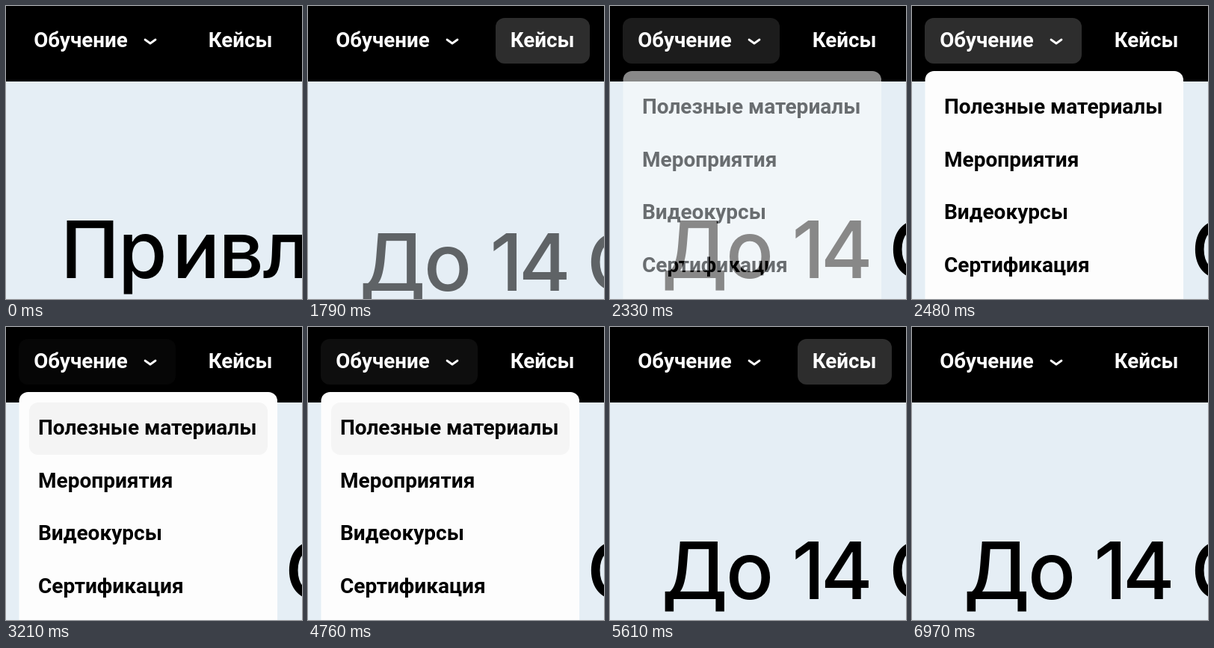
Recreate the animation shown at these times as an HTML page with a canvas. Size 396 px wide and 392 px high, loop 7330 ms.

```html
<!DOCTYPE html>
<html lang="ru">
<head>
<meta charset="utf-8">
<title>Меню</title>
<style>
  html, body { margin: 0; width: 100%; height: 100%; overflow: hidden; background: #e5eef5; }
  canvas { display: block; }
</style>
</head>
<body>
<canvas id="stage" width="396" height="392"></canvas>
<script>
const LOOP = 7330;
const HEADER_FONT = '600 27.7px Roboto, sans-serif';
const MENU_FONT = '600 28px Roboto, sans-serif';
const TITLE_FONT = '540 106px Inter, sans-serif';
const ITEMS = ['Полезные материалы', 'Мероприятия', 'Видеокурсы', 'Сертификация'];

// Letters with the horizontal centre of their ink
const FIRST_TITLE = [['П', 112.5], ['р', 184], ['и', 254.5], ['в', 316], ['л', 371.5]];
const SECOND_TITLE = [['Д', 113], ['о', 187], ['1', 263.5], ['4', 316.5], ['С', 412]];
const TITLE_SWAP = 1790;

// Opacity over time, as [ms, value] pairs
const CASES_HOVER = [[1450, 0], [1640, 1], [2060, 1], [2240, 0], [5300, 0], [5450, 1], [6240, 1], [6480, 0]];
const LEARN_HOVER = [[2210, 0], [2400, 1], [3050, 1], [3210, 0.14], [4730, 0.14], [4880, 1], [5120, 1], [5350, 0]];
const MENU = [[2240, 0], [2410, 1], [5120, 1], [5350, 0]];
const ITEM_HOVER = [[3050, 0], [3210, 1], [4730, 1], [4880, 0]];

const canvas = document.getElementById('stage');
const ctx = canvas.getContext('2d');
const layer = document.createElement('canvas');
layer.width = canvas.width;
layer.height = canvas.height;
const menuCtx = layer.getContext('2d');

function track(keys, t) {
  const next = keys.findIndex(([time]) => time > t);
  if (next === 0) return keys[0][1];
  if (next < 0) return keys[keys.length - 1][1];
  const [t0, v0] = keys[next - 1];
  const [t1, v1] = keys[next];
  return v0 + (v1 - v0) * (t - t0) / (t1 - t0);
}

function box(c, x, y, w, h, color, alpha = 1) {
  c.globalAlpha = alpha;
  c.fillStyle = color;
  c.beginPath();
  c.roundRect(x, y, w, h, 12);
  c.fill();
  c.globalAlpha = 1;
}

function label(c, text, x, y, font, color) {
  c.font = font;
  c.fillStyle = color;
  c.fillText(text, x, y);
}

function drawTitle(t) {
  const entering = t >= TITLE_SWAP;
  const p = entering ? Math.min(1, (t - TITLE_SWAP) / 210) : 1;
  const rest = (1 - p) ** 2;
  ctx.font = TITLE_FONT;
  ctx.fillStyle = '#000';
  ctx.globalAlpha = 1 - 0.42 * rest;
  for (const [char, centre] of entering ? SECOND_TITLE : FIRST_TITLE) {
    const ink = ctx.measureText(char);
    const x = centre + (ink.actualBoundingBoxLeft - ink.actualBoundingBoxRight) / 2;
    ctx.fillText(char, x, 364 + 17 * rest);
  }
  ctx.globalAlpha = 1;
}

function drawHeader(t) {
  ctx.fillStyle = '#000';
  ctx.fillRect(0, 0, 396, 101);
  box(ctx, 17, 16, 210, 61, '#2d2d2d', track(LEARN_HOVER, t));
  box(ctx, 251, 16, 126, 61, '#2d2d2d', track(CASES_HOVER, t));
  label(ctx, 'Обучение', 37.2, 55, HEADER_FONT, '#fff');
  label(ctx, 'Кейсы', 270.8, 55, HEADER_FONT, '#fff');

  ctx.strokeStyle = '#fff';
  ctx.lineWidth = 2.8;
  ctx.lineCap = ctx.lineJoin = 'round';
  ctx.beginPath();
  ctx.moveTo(186, 45);
  ctx.lineTo(193, 50);
  ctx.lineTo(200, 45);
  ctx.stroke();
}

// Rendered on its own layer so that it fades as one group
function drawMenu(t) {
  const alpha = track(MENU, t);
  if (!alpha) return;
  menuCtx.clearRect(0, 0, 396, 392);
  box(menuCtx, 17.5, 87, 345.5, 330, '#fdfdfd');
  box(menuCtx, 31, 101, 319, 70, '#f4f4f4', track(ITEM_HOVER, t));
  ITEMS.forEach((text, i) => label(menuCtx, text, 43, 144 + 70.67 * i, MENU_FONT, '#000'));
  ctx.globalAlpha = alpha;
  ctx.drawImage(layer, 0, 0);
  ctx.globalAlpha = 1;
}

function frame() {
  const t = performance.now() % LOOP;
  ctx.fillStyle = '#e5eef5';
  ctx.fillRect(0, 0, 396, 392);
  drawTitle(t);
  drawHeader(t);
  drawMenu(t);
  requestAnimationFrame(frame);
}
frame();
</script>
</body>
</html>
```
